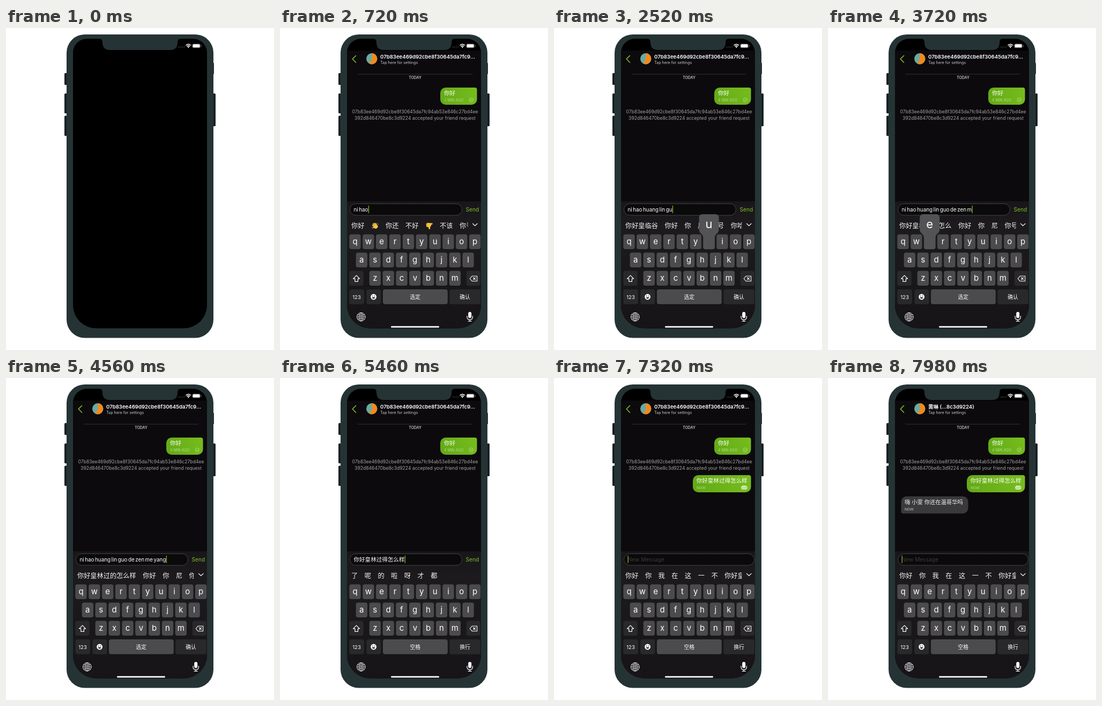
An HTML page with a canvas that plays this animation: 500 by 600 pixels, repeating every 8 s.

```html
<!DOCTYPE html>
<html lang="en">
<head>
<meta charset="utf-8">
<title>Chat typing</title>
<style>
html, body { margin: 0; width: 100%; height: 100%; overflow: hidden; background: #fff; }
canvas { display: block; width: 500px; height: 600px; }
</style>
</head>
<body>
<canvas id="stage"></canvas>
<script>
const LOOP = 8000;
const FONT = 'Inter, "Noto Sans CJK SC", "Noto Sans CJK", sans-serif';
const GREEN = '#7fc122';
const BODY = '#253335';
const KEY = '#4b4a4d';
const DARK_KEY = '#29282a';

const ID = ['07b83ee469d92cbe8f30645da7fc94ab53e846c27bd4ee', '392d846470be8c3d9224'];
const PINYIN = 'ni hao huang lin guo de zen me yang';
const MESSAGE = '你好皇林过得怎么样';
const REPLY = '嗨 小雯 你还在温哥华吗';

// Moment each letter lands in the field
const PRESSES = [
  120, 240, 360, 480, 600,
  915, 1090, 1265, 1440, 1615, 1790, 1965, 2140, 2315, 2490,
  2650, 2840, 3020, 3210, 3390, 3510, 3630, 3780, 3960, 4120, 4280, 4440
];
const AT = { show: 60, minute: 1500, commit: 4920, sent: 5940, delivered: 6300, reply: 7500 };

const REST = ['你好', '你', '尼', '你号', '你哈'];
const IDLE = ['你好', '你', '我', '在', '这', '一', '不', '你好皇'];
const AFTER = ['了', '呢', '的', '啦', '呀', '才', '都'];
const SUGGESTIONS = [
  [1, ['你', '年', '那', '能', '女', '拿', '内', '难', '南', '您']],
  [2, ['你', '呢', '尼', '泥', '拟', '逆', '妮', '腻', '匿', '倪']],
  [3, ['你好', '你还', '你会', '你和', '你', '尼', '你很']],
  [5, ['你好', 'wave', '你还', '不好', 'down', '不该', '你号']],
  [6, ['你好好', ...REST]],
  [8, ['你好花', ...REST]],
  [10, ['你好皇', ...REST]],
  [13, ['你好皇临', ...REST]],
  [14, ['你好皇临谷', ...REST]],
  [16, ['你好皇临过', ...REST]],
  [18, ['你好皇林过的', ...REST]],
  [22, ['你好皇林过的怎么', ...REST]],
  [27, ['你好皇林过的怎么样', ...REST]]
];

const PITCH = 24.85;
const ROWS = [
  { letters: 'qwertyuiop', x: 140, y: 384.5 },
  { letters: 'asdfghjkl', x: 152.3, y: 418.5 },
  { letters: 'zxcvbnm', x: 177.3, y: 452.5 }
];
const KEY_W = 21.4, KEY_H = 27.8;

const canvas = document.getElementById('stage');
const ctx = canvas.getContext('2d');
const dpr = window.devicePixelRatio || 1;
canvas.width = 500 * dpr;
canvas.height = 600 * dpr;

function box(x, y, w, h, r, fill, stroke) {
  ctx.beginPath();
  ctx.roundRect(x, y, w, h, r);
  if (fill) { ctx.fillStyle = fill; ctx.fill(); }
  if (stroke) { ctx.strokeStyle = stroke; ctx.lineWidth = 1; ctx.stroke(); }
}

function disc(x, y, r, fill) {
  ctx.beginPath();
  ctx.arc(x, y, r, 0, 7);
  ctx.fillStyle = fill;
  ctx.fill();
}

function path(d, color, width, x = 0, y = 0) {
  ctx.save();
  ctx.translate(x, y);
  ctx.strokeStyle = color;
  ctx.lineWidth = width;
  ctx.lineCap = ctx.lineJoin = 'round';
  ctx.stroke(new Path2D(d));
  ctx.restore();
}

function text(s, x, y, size, color, align = 'left', weight = 400) {
  ctx.font = `${weight} ${size}px ${FONT}`;
  ctx.textAlign = align;
  ctx.fillStyle = color;
  ctx.fillText(s, x, y);
}

function drawBody() {
  const button = '#172225';
  [[109, 84, 22], [109, 122, 37], [109, 163.5, 37.5], [384, 122, 61]]
    .forEach(([x, y, h]) => box(x, y, 7, h, 1.5, button));
  box(384, 65, 4, 21, 1, BODY);
  box(113, 12, 274, 565.5, 34, BODY);
}

function screenPath() {
  ctx.beginPath();
  ctx.roundRect(125, 20, 250, 539.5, [26, 26, 43, 43]);
}

function drawStatus() {
  ctx.fillStyle = BODY;
  ctx.fill(new Path2D('M174 19H326V20Q320 20 320 27Q320 41 306 41H194Q180 41 180 27Q180 20 174 20Z'));
  for (let i = 0; i < 4; i++) disc(322.7 + i * 3.2, 35.5, 0.9, '#444');
  path('M-4.3-1.6Q0-5.2 4.3-1.6M-2.4.5Q0-1.6 2.4.5', '#fff', 1.5, 340.3, 33.6);
  disc(340.3, 35.8, 1.2, '#fff');
  box(347.5, 29.8, 15.5, 7, 2.2, null, '#555');
  box(348.5, 30.3, 13.2, 6, 1.6, '#fff');
  box(364, 32, 1, 2.6, 0.5, '#666');
}

function drawHeader(t) {
  path('M141.5 51.5L135.2 57.8L141.5 64.2', GREEN, 1.6);
  disc(171.2, 57.3, 10.2, '#68aaa3');
  ctx.save();
  ctx.beginPath();
  ctx.arc(171.2, 57.3, 10.2, 0, 7);
  ctx.clip();
  ctx.fillStyle = '#ef8a21';
  ctx.fill(new Path2D('M171 46L183 46V69H164L171 60Z'));
  ctx.restore();
  const title = t < AT.reply ? ID[0].slice(0, 29) + '...' : `黄琳 (...${ID[1].slice(-8)})`;
  text(title, 187, 57, 9.6, '#fff', 'left', 600);
  text('Tap here for settings', 187, 67, 7.2, '#c9c9c9');
  ctx.setLineDash([1, 1]);
  path('M145 86H359', '#444', 0.8);
  ctx.setLineDash([]);
  text('TODAY', 252, 94.5, 6.9, '#e0e0e0', 'center', 500);
}

function greenBubble(x, y, w) {
  const g = ctx.createLinearGradient(x, y + 32, x + w, y);
  g.addColorStop(0, '#62a916');
  g.addColorStop(1, '#77bd1e');
  box(x, y, w, 32, [10, 4, 10, 10], g);
}

function check(x, y, filled) {
  ctx.beginPath();
  ctx.arc(x, y, 3.7, 0, 7);
  ctx.strokeStyle = '#b9dc8e';
  ctx.lineWidth = 0.8;
  if (filled) { ctx.fillStyle = '#d7ecba'; ctx.fill(); }
  ctx.stroke();
  path('M-1.7 0L-.4 1.4L2-1.5', filled ? '#68ad1b' : '#c8e4a5', 0.8, x, y);
}

function drawChat(t) {
  const faint = '#b5d98a', notice = '#a2a2a2';
  greenBubble(299, 111, 68.5);
  text('你好', 306, 125, 10.6, '#fff');
  text(`${t < AT.minute ? 3 : 4} MIN AGO`, 306, 137, 6.9, faint);
  check(356.7, 134, false);
  text(ID[0], 252, 159, 8.6, notice, 'center');
  text(ID[1] + ' accepted your friend request', 252, 171, 8.6, notice, 'center');
  if (t >= AT.sent) {
    greenBubble(259, 181, 108.5);
    text(MESSAGE, 265.7, 195, 10.55, '#fff');
    text('NOW', 266, 207, 6.7, faint);
    if (t >= AT.delivered) check(353, 204.2, true);
    check(356.7, 204.2, t >= AT.delivered);
  }
  if (t >= AT.reply) {
    box(136.5, 220.5, 125, 32, [10, 10, 10, 4], '#3a393b');
    text(REPLY, 143, 234.5, 10.3, '#f4f4f4');
    text('NOW', 143, 246.5, 6.7, '#c4c4c4');
  }
}

function typedPinyin(count) {
  let end = 0;
  for (let n = 0; n < count; end++) if (PINYIN[end] !== ' ') n++;
  return PINYIN.slice(0, end);
}

function drawInput(t, count) {
  const content = t >= AT.sent ? '' : t >= AT.commit ? MESSAGE : typedPinyin(count);
  box(130.5, 327.5, content ? 209 : 243, 21.5, 10.7, '#0b0a0b', '#434244');
  let caret = 137.5;
  if (content) {
    ctx.wordSpacing = '-1.3px';
    text(content, 137.5, 341.5, t >= AT.commit ? 10.55 : 9.9, '#fff');
    caret += ctx.measureText(content).width + 0.3;
    ctx.wordSpacing = '0px';
    text('Send', 346.5, 341.5, 10.2, GREEN);
  } else {
    text('New Message', 137.5, 341.5, 10.2, '#3b3b3c');
  }
  ctx.fillStyle = GREEN;
  ctx.fillRect(caret, 331, 1.2, 14);
}

function drawHand(kind, x, y) {
  ctx.save();
  ctx.translate(x, y);
  const skin = '#f8c33c';
  if (kind === 'wave') {
    ctx.rotate(-0.65);
    path('M-2.6 1L-3-3.6M-.8 0V-5M1.2 0L1.4-4.6M3 1L3.5-3M-2 3L-4.8.6', skin, 1.9);
    box(-3.4, -1, 7.2, 6.6, 3, skin);
    ctx.rotate(0.65);
    path('M4-5Q5.8-4 6-2M-6 2Q-5.6 4.6-4 5.6', '#8fb3c4', 0.8);
  } else {
    box(-5.6, -5.2, 9, 7.6, 2.4, skin);
    path('M-.4 1L.4 5M2-3L4.8-3.6', skin, 2.9);
    path('M-5-2.6H-1.4M-5-.2H-1.4', '#d39a25', 0.6);
  }
  ctx.restore();
}

function drawSuggestions(t, count) {
  let list = IDLE;
  if (t >= AT.commit && t < AT.sent) list = AFTER;
  else if (t < AT.commit && count) list = SUGGESTIONS.filter(([min]) => min <= count).pop()[1];
  ctx.save();
  ctx.beginPath();
  ctx.rect(126, 354, 224.5, 28);
  ctx.clip();
  let x = 133;
  for (const word of list) {
    if (word === 'wave' || word === 'down') {
      drawHand(word, x + 7.5, 368.5);
      x += 27.2;
    } else {
      text(word, x, 373, 12.2, '#f5f5f5');
      x += word.length * 12.2 + 12.5;
    }
  }
  ctx.restore();
  if (list !== AFTER) path('M359.5 364.5L363.7 368.5L368 364.5', '#e8e8e8', 1.3);
}

function drawKeys(composing) {
  for (const { letters, x, y } of ROWS) {
    [...letters].forEach((c, i) => {
      const cx = x + i * PITCH;
      box(cx - KEY_W / 2, y + 1, KEY_W, KEY_H, 4, '#0d0d0e');
      box(cx - KEY_W / 2, y, KEY_W, KEY_H, 4, KEY);
      text(c, cx, y + 18.5, 15, '#fff', 'center');
    });
  }
  [[129.3, 452.5, 26.5], [347.7, 452.5, 26], [129.3, 487, 27.7], [161.3, 487, 27], [316.3, 487, 57.5]]
    .forEach(([x, y, w]) => box(x, y, w, KEY_H, 4, DARK_KEY));
  box(192, 488, 120.8, KEY_H, 4, '#0d0d0e');
  box(192, 487, 120.8, KEY_H, 4, KEY);

  path('M0-5.8L6 .2H2.8V5.4H-2.8V.2H-6Z', '#fff', 1.2, 142.6, 467);
  path('M-6.8 0L-2.6-4.8H6.6V4.8H-2.6ZM-.5-2L3.5 2M3.5-2L-.5 2', '#fff', 1.1, 361, 467);
  text('123', 143, 504.5, 9.6, '#fff', 'center');
  disc(174.6, 501, 5.4, '#fff');
  disc(172.7, 499.4, 0.8, '#222');
  disc(176.5, 499.4, 0.8, '#222');
  ctx.fillStyle = '#222';
  ctx.fill(new Path2D('M171.6 501.8H177.6Q177.2 504.4 174.6 504.4Q172 504.4 171.6 501.8Z'));
  text(composing ? '选定' : '空格', 252.3, 505, 9.8, '#fff', 'center');
  text(composing ? '确认' : '换行', 345, 505, 9.8, '#fff', 'center');
}

function drawFooter() {
  ctx.strokeStyle = '#e9e9e9';
  ctx.lineWidth = 1;
  for (const rx of [7.8, 3.7]) {
    ctx.beginPath();
    ctx.ellipse(151.3, 538.3, rx, 7.8, 0, 0, 7);
    ctx.stroke();
  }
  path('M-7.8 0H7.8M0-7.8V7.8M-6.5-4Q0-1.8 6.5-4M-6.5 4Q0 1.8 6.5 4', '#e9e9e9', 0.9, 151.3, 538.3);
  box(351.2, 529, 6, 11.5, 3, '#fff');
  path('M-5.2-1.5V.8Q-5.2 5.2 0 5.2Q5.2 5.2 5.2.8V-1.5M0 5.2V8M-3 8H3', '#fff', 1.2, 354.2, 538.3);
  box(207, 555.5, 90, 2.8, 1.4, '#fff');
}

function drawPopup(letter) {
  const row = ROWS.find(r => r.letters.includes(letter));
  const cx = row.x + row.letters.indexOf(letter) * PITCH;
  const left = Math.max(cx - 18.5, 127.5);
  const right = Math.min(cx + 18.5, 373.5);
  const top = row.y - 37.5, neck = row.y - 9, base = row.y + KEY_H;
  const l = cx - KEY_W / 2, r = cx + KEY_W / 2;
  ctx.beginPath();
  ctx.moveTo(left + 6, top);
  ctx.arcTo(right, top, right, neck, 6);
  ctx.lineTo(right, neck);
  ctx.bezierCurveTo(right, neck + 8, r, neck + 7, r, neck + 16);
  ctx.arcTo(r, base, l, base, 4);
  ctx.arcTo(l, base, l, neck + 16, 4);
  ctx.lineTo(l, neck + 16);
  ctx.bezierCurveTo(l, neck + 7, left, neck + 8, left, neck);
  ctx.arcTo(left, top, right, top, 6);
  ctx.closePath();
  ctx.fillStyle = '#535355';
  ctx.fill();
  text(letter, (left + right) / 2, row.y - 11.5, 22, '#fff', 'center');
}

function drawKeyboard(t) {
  const count = PRESSES.filter(p => p <= t).length;
  const g = ctx.createLinearGradient(0, 323, 0, 560);
  g.addColorStop(0, '#181619');
  g.addColorStop(0.2, '#1c1a1d');
  g.addColorStop(1, '#161417');
  ctx.fillStyle = g;
  ctx.fillRect(125, 323, 250, 237);
  drawInput(t, count);
  drawSuggestions(t, count);
  drawKeys(t < AT.commit && count > 0);
  drawFooter();
  const pressed = PRESSES.findIndex(p => t >= p - 80 && t < p + 60);
  if (pressed >= 0) drawPopup(PINYIN.replaceAll(' ', '')[pressed]);
}

function draw(t) {
  ctx.setTransform(dpr, 0, 0, dpr, 0, 0);
  ctx.fillStyle = '#fff';
  ctx.fillRect(0, 0, 500, 600);
  drawBody();
  ctx.save();
  screenPath();
  ctx.fillStyle = '#000';
  ctx.fill();
  ctx.clip();
  if (t >= AT.show) {
    ctx.fillStyle = '#0c0a0d';
    ctx.fillRect(125, 42, 250, 281);
    drawHeader(t);
    drawChat(t);
    drawKeyboard(t);
  }
  drawStatus();
  ctx.restore();
}

const start = performance.now();
function tick() {
  draw((performance.now() - start) % LOOP);
  requestAnimationFrame(tick);
}
tick();
</script>
</body>
</html>
```
